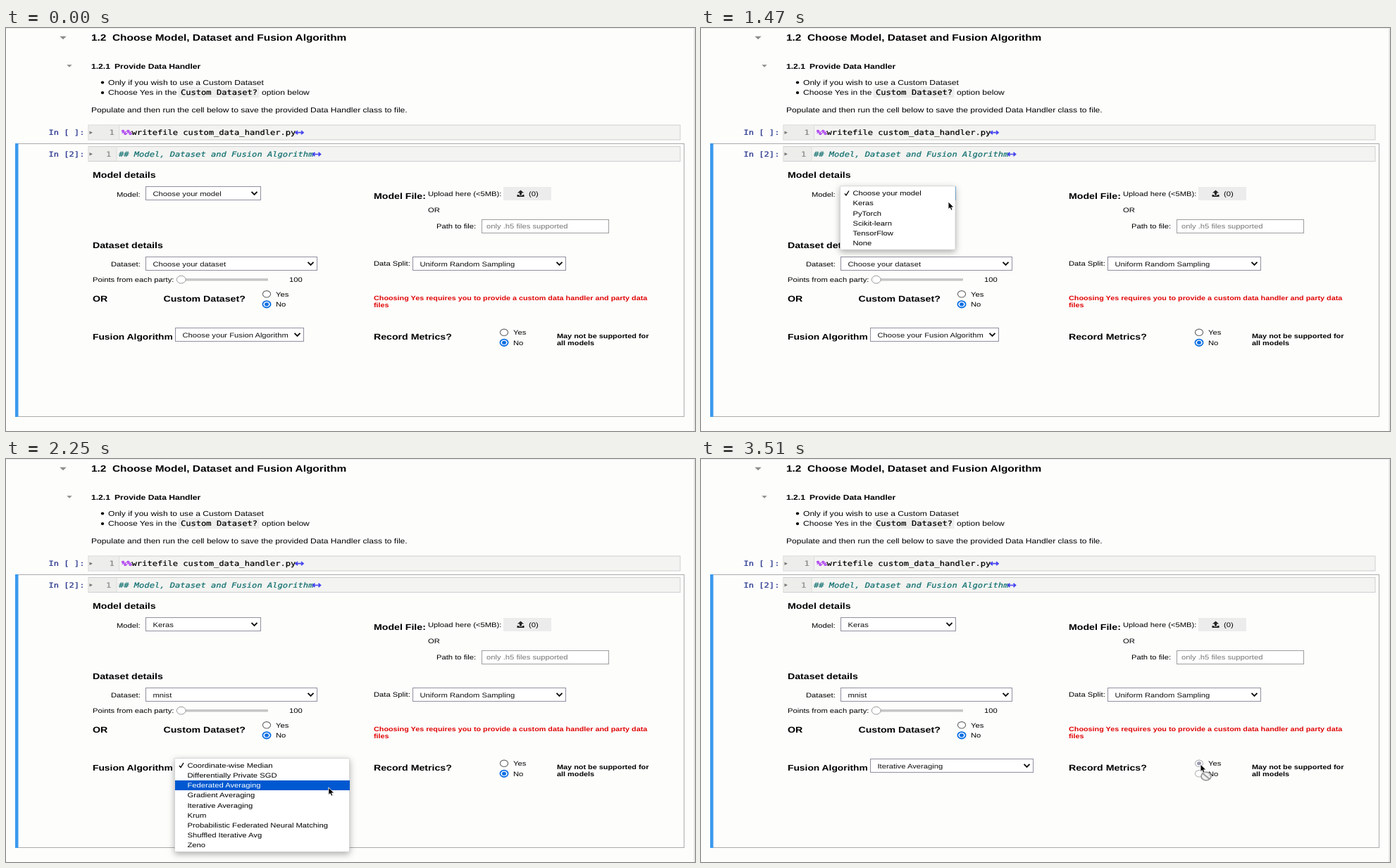
Recreate the animation shown at these times as an HTML page. Size 978 px wide and 573 px high, loop 3570 ms.

```html
<!DOCTYPE html>
<html lang="en">
<head>
<meta charset="utf-8">
<title>Notebook form</title>
<style>
html, body { margin: 0; width: 100%; height: 100%; overflow: hidden; background: #fdfdfc; }
svg { display: block; width: 978px; height: 573px; }
text { font-family: "Liberation Sans", Arial, sans-serif; white-space: pre; text-rendering: geometricPrecision; }
.mono { font-family: "DejaVu Sans Mono", monospace; }
.b { font-weight: bold; }
.menu { filter: drop-shadow(0 3px 5px rgba(0,0,0,.32)); }
</style>
</head>
<body>
<svg id="stage" viewBox="0 0 978 573" xmlns="http://www.w3.org/2000/svg"></svg>
<script>
const LOOP = 3570, STEP = 30, ROW = 14.2;
const OPEN_MODEL = 1230, PICK_MODEL = 1590, OPEN_FUSION = 2100, PICK_FUSION = 2460, RECORD = 3090;
const INK = '#000', EDGE = '#9090a0', FOCUS = '#64b5f6', BLUE = '#0b6fe3';
const stage = document.getElementById('stage');
const $ = id => document.getElementById(id);

// The page is shown squeezed: one scale for all lettering.
const text = (x, y, s, size = 13, cls = '', fill = INK, id = '') =>
  `<text ${id && `id="${id}"`} transform="translate(${x} ${y}) scale(.863 .725)" font-size="${size}" class="${cls}" fill="${fill}">${s}</text>`;
const bold = (x, y, s, size = 16.4, fill) => text(x, y, s, size, 'b', fill);
const code = (x, y, s, fill, style = '') =>
  `<g stroke="${fill}" stroke-width=".3" style="${style}">${text(x, y, s, 14, 'mono', fill)}</g>`;
const rect = (x, y, w, h, fill, stroke = 'none', extra = '') =>
  `<rect x="${x}" y="${y}" width="${w}" height="${h}" fill="${fill}" stroke="${stroke}" ${extra}/>`;
const path = (d, stroke, width, fill = 'none', extra = '') =>
  `<path d="${d}" stroke="${stroke}" stroke-width="${width}" fill="${fill}" ${extra}/>`;

function select(id, x, y, w, label) {
  return rect(x + .5, y + .5, w - 1, 19, '#fff', EDGE, `id="${id}Box"`) +
    text(x + 10.5, y + 14.4, label, 13, '', '#111', id + 'Text') +
    `<g id="${id}Arrow" transform="translate(${x + w - 9.5} ${y + 9.9})">` +
    path('M-4-2L0 2L4-2', '#111', 2) + '</g>';
}

function radio(id, x, y, label) {
  return `<g id="${id}"><ellipse cx="${x}" cy="${y}" rx="5.6" ry="4.7" fill="#fff" stroke="#666" stroke-width="1.1"/>` +
    `<ellipse class="dot" cx="${x}" cy="${y}" rx="3" ry="2.6" fill="${BLUE}"/></g>` +
    text(x + 13, y + 3.6, label);
}

function menu(id, x, y, w, items) {
  const h = items.length * ROW + 5.2;
  return `<g id="${id}"><g class="menu">${rect(x, y, w, h, '#fff', '#c4c4c4', 'stroke-width=".6" rx="1"')}</g>` +
    rect(x, y, w, 14, '#0058d0', 'none', `id="${id}Bar" shape-rendering="crispEdges"`) +
    path(`M${x + 6.5} ${y + 10.5}l2 2.6l4-6.4`, INK, 1.3) +
    items.map((s, i) => text(x + 18, y + 13.3 + i * ROW, s, 13, '', INK, id + i)).join('') + '</g>';
}

const cell = (y, numX, gutter, h) =>
  rect(117, y, 840, h, '#f3f3f1', '#cfcfcf') + rect(117.5, y + .5, gutter - 117.5, h - 1, '#ededeb') +
  path(`M${gutter} ${y}v${h}`, '#dcdcda', 1) +
  path(`M118.5 ${y + 8.5}l4.5 2.2l-4.5 2.2z`, 'none', 0, '#777') +
  code(numX, y + 14, '1', '#888');
const fold = (x, y) => path(`M${x} ${y}h11M${x + 3} ${y - 2.5}L${x} ${y}l3 2.5M${x + 8} ${y - 2.5}l3 2.5l-3 2.5`, '#4646f0', 1.7);
const caret = (x, y, w, h) => path(`M${x - w} ${y - h}h${2 * w}l${-w} ${2 * h}z`, 'none', 0, '#8c8c8c');
const bullet = y => `<ellipse cx="137" cy="${y}" rx="2.2" ry="1.9" fill="${INK}"/>`;

const models = ['Choose your model', 'Keras', 'PyTorch', 'Scikit-learn', 'TensorFlow', 'None'];
const fusions = ['Coordinate-wise Median', 'Differentially Private SGD', 'Federated Averaging', 'Gradient Averaging',
  'Iterative Averaging', 'Krum', 'Probabilistic Federated Neural Matching', 'Shuffled Iterative Avg', 'Zeno'];

stage.innerHTML = [
  rect(0, 0, 978, 573, '#fdfdfc'),
  rect(0, 0, 978, 1, '#ececec'),
  rect(976, 0, 2, 573, '#e6e6e6'),

  caret(81, 14, 4.7, 2.3), caret(90, 54, 3.7, 1.8),
  bold(121, 18.4, '1.2', 17.85), bold(151, 18.4, 'Choose Model, Dataset and Fusion Algorithm', 17.85),
  bold(121, 58, '1.2.1', 14), bold(154, 58, 'Provide Data Handler', 14),
  bullet(77.5), bullet(92),
  text(145, 80.5, 'Only if you wish to use a Custom Dataset', 14),
  text(145, 95, 'Choose Yes in the', 14),
  rect(244.5, 83.5, 115, 15.5, '#eeeeed', 'none', 'rx="1"'),
  code(248, 95, 'Custom Dataset?', INK),
  text(363, 95, 'option below', 14),
  text(121, 120, 'Populate and then run the cell below to save the provided Data Handler class to file.', 14),

  rect(13.5, 164.5, 949, 388, '#fdfdfc', '#ababab'),
  rect(13, 164, 4.5, 389, '#3b99ee'),
  code(60.5, 151.7, 'In [ ]:', '#27358c'), code(60.5, 182.5, 'In [2]:', '#27358c'),
  cell(138, 146.5, 160.5, 21), cell(168.5, 142, 157, 21),
  code(164, 151.7, '%%', '#a020f0', 'font-weight:bold'),
  code(178.6, 151.7, 'writefile custom_data_handler.py', INK), fold(411, 148.7),
  code(160, 182.5, '## Model, Dataset and Fusion Algorithm', '#10706f', 'font-style:italic'), fold(435.5, 179.5),

  bold(123, 213.3, 'Model details'),
  text(157, 240, 'Model:'), select('model', 198, 225, 164, models[0]),
  bold(522, 243.1, 'Model File:'),
  text(599, 239, 'Upload here (&lt;5MB):'),
  rect(706, 226, 68, 19, '#ececec'),
  path('M730.5 230.5l4.5 4h-3v3h-3v-3h-3z M725.5 237h2.5v1.2h5v-1.2h2.5v3h-10z', 'none', 0, '#222'),
  text(742, 239, '(0)'),
  text(599, 261.6, 'OR'),
  text(611, 285.2, 'Path to file:'),
  rect(675.5, 272.5, 180, 19, '#fff', '#9e9e9e'),
  text(682, 285.2, 'only .h5 files supported', 13, '', '#757575'),

  bold(123, 313, 'Dataset details'),
  text(149, 339.4, 'Dataset:'), select('data', 198, 325, 244, 'Choose your dataset'),
  text(522, 338.4, 'Data Split:'), select('split', 577, 325, 218, 'Uniform Random Sampling'),
  text(123, 361.2, 'Points from each party:'),
  rect(249, 356.5, 122.5, 2.6, '#c8c8c8', '#b0b0b0', 'stroke-width=".5"'),
  `<ellipse cx="248.7" cy="357.7" rx="6.4" ry="5.4" fill="#fff" stroke="#999"/>`,
  text(402, 361.2, '100'),
  bold(123, 389, 'OR'), bold(223.5, 389, 'Custom Dataset?'),
  radio('customYes', 370, 378.3, 'Yes'), radio('customNo', 370, 392.8, 'No'),
  bold(522, 386.8, 'Choosing Yes requires you to provide a custom data handler and party data', 12.5, '#e00505'),
  bold(522, 396.8, 'files', 12.5, '#e00505'),

  bold(123, 443.3, 'Fusion Algorithm', 16),
  select('fusion', 240, 426, 183, 'Choose your Fusion Algorithm'),
  bold(522, 443.3, 'Record Metrics?'),
  radio('recYes', 707, 432.8, 'Yes'), radio('recNo', 707, 447.3, 'No'),
  bold(782, 441.2, 'May not be supported for', 12.6), bold(782, 451.3, 'all models', 12.6),

  menu('modelMenu', 197.5, 224.8, 163.5, models),
  menu('fusionMenu', 239.5, 425.5, 248, fusions),
  '<g id="cursor">',
  '<g id="blocked"><ellipse cx="8" cy="17" rx="7" ry="5.9" fill="#eeeeee" fill-opacity=".85" stroke="#999" stroke-width="1.8"/>',
  path('M3.2 13L12.8 21', '#999', 1.8), '</g>',
  path('M0 0V10.6L2.4 8.6L4.1 12.2L6.1 11.4L4.5 7.9H7.9Z', '#fff', .9, '#000', 'stroke-linejoin="round"'),
  '</g>'
].join('');

const route = [
  [60, 985, 330], [450, 353, 234], [1260, 353, 234], [1440, 351, 247], [1680, 351, 247],
  [1980, 456, 437], [2130, 456, 437], [2340, 459, 486.5], [2490, 459, 486.5],
  [2740, 698, 444], [2820, 698, 444], [3030, 709, 434], [LOOP, 709, 434]
];

function pointer(t) {
  const i = Math.max(1, route.findIndex(p => p[0] > t));
  const [t0, x0, y0] = route[i - 1], [t1, x1, y1] = route[i];
  const u = Math.min(1, Math.max(0, (t - t0) / (t1 - t0))), e = u * u * (3 - 2 * u);
  return [x0 + (x1 - x0) * e, y0 + (y1 - y0) * e];
}

const show = (el, on) => el.setAttribute('visibility', on ? 'inherit' : 'hidden');

function setRadio(id, on, off = false) {
  const g = $(id), [ring, dot] = g.children;
  ring.setAttribute('stroke', off ? '#b4b4b8' : on ? BLUE : '#666');
  ring.setAttribute('stroke-width', on && !off ? 1.8 : 1.1);
  dot.setAttribute('fill', off ? '#9a9aae' : BLUE);
  show(dot, on);
}

function setMenu(id, top, on, hot, count) {
  show($(id), on);
  const bar = $(id + 'Bar');
  bar.setAttribute('visibility', on && hot >= 0 ? 'visible' : 'hidden');
  bar.setAttribute('y', Math.round(top + 2.8 + Math.max(0, hot) * ROW));
  for (let i = 0; i < count; i++) $(id + i).setAttribute('fill', i === hot ? '#fff' : INK);
}

function render(t) {
  const [x, y] = pointer(t);
  const picked = t >= PICK_MODEL, recorded = t >= RECORD;
  const wide = picked ? 232 : 183;

  $('modelText').textContent = picked ? models[1] : models[0];
  $('dataText').textContent = picked ? 'mnist' : 'Choose your dataset';
  $('fusionText').textContent = t >= PICK_FUSION ? fusions[4] : picked ? fusions[0] : 'Choose your Fusion Algorithm';
  $('fusionBox').setAttribute('width', wide - 1);
  $('fusionArrow').setAttribute('transform', `translate(${240 + wide - 9.5} 435.9)`);
  $('modelBox').setAttribute('stroke', t >= OPEN_MODEL && t < OPEN_FUSION ? FOCUS : EDGE);
  $('fusionBox').setAttribute('stroke', t >= OPEN_FUSION && !recorded ? FOCUS : EDGE);

  setMenu('modelMenu', 224.8, t >= OPEN_MODEL && !picked, t >= 1500 ? 1 : -1, models.length);
  setMenu('fusionMenu', 425.5, t >= OPEN_FUSION && t < PICK_FUSION, Math.floor((y - 428.3) / ROW), fusions.length);

  setRadio('customYes', false);
  setRadio('customNo', true);
  setRadio('recYes', recorded, recorded);
  setRadio('recNo', !recorded, recorded);

  show($('cursor'), t >= 60);
  show($('blocked'), recorded);
  $('cursor').setAttribute('transform', `translate(${x.toFixed(2)} ${y.toFixed(2)})`);
}

const start = performance.now();
function tick() {
  const t = (performance.now() - start) % LOOP;
  render(Math.floor(t / STEP) * STEP);
  requestAnimationFrame(tick);
}
tick();
</script>
</body>
</html>
```
